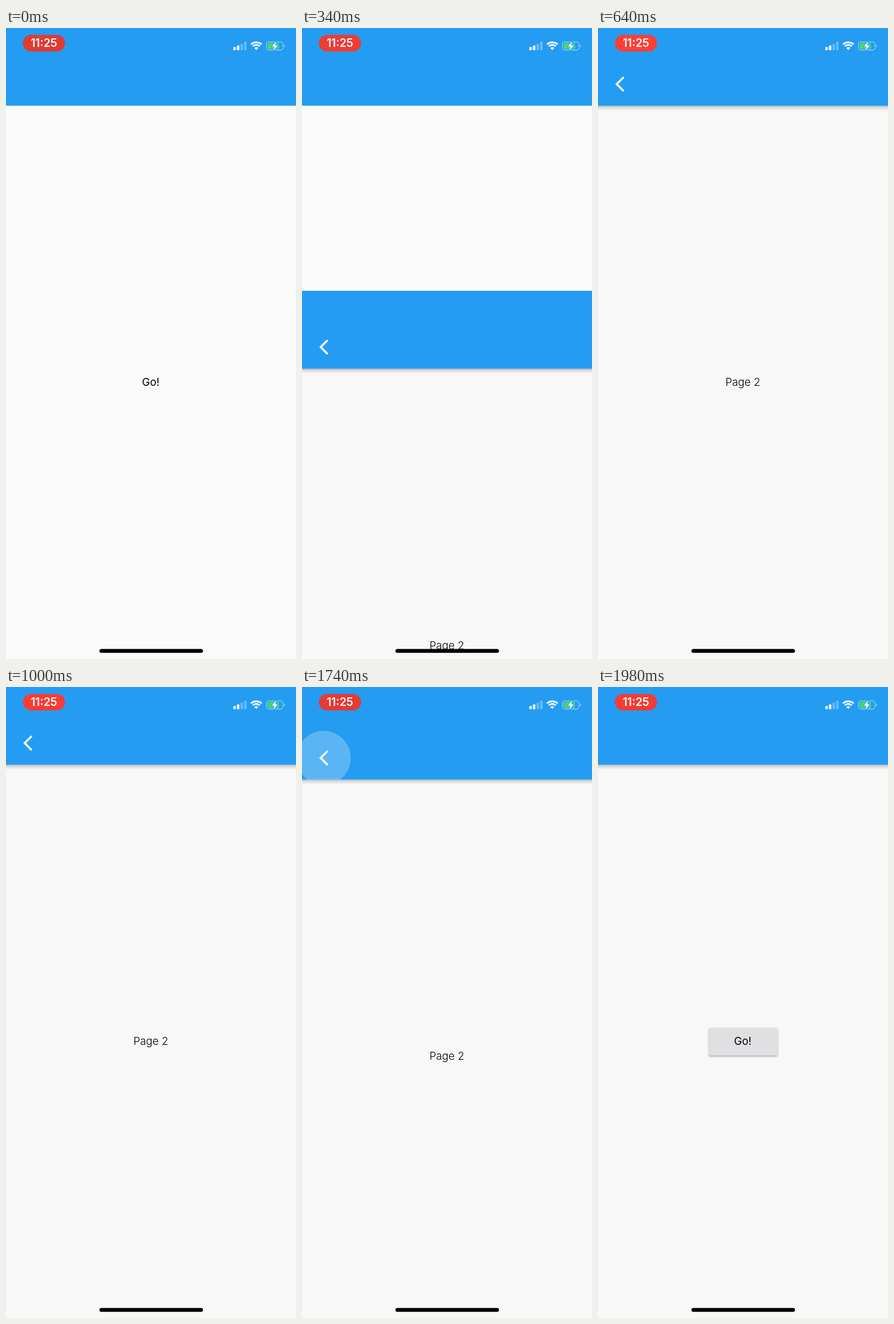
Write an HTML page that moves like this. It is 508x1102 px and loops after 2 s.

```html
<!DOCTYPE html>
<html lang="en">
<head>
<meta charset="utf-8">
<title>Page slide</title>
<style>
  html, body { margin: 0; width: 100%; height: 100%; overflow: hidden; background: #fafafa; }
  svg { display: block; width: 100%; height: 100%; }
  text { font-family: Inter, Roboto, sans-serif; text-anchor: middle; }

  .anim { animation: 2s linear infinite; }
  .bar { fill: #249cf2; }
  .label { font-size: 18.8px; }
  .thin { font-weight: 350; }

  #home { animation-name: home; }
  #barShade { animation-name: shade; }
  #button { animation-name: press; filter: drop-shadow(0 2px 1.6px rgba(0, 0, 0, .3)); }
  #page { animation-name: slide; }
  #halo, #splash { fill: #fff; opacity: 0; transform-origin: 38px 98px; }
  #halo { animation-name: halo; }
  #splash { animation-name: splash; }
  #pill { animation-name: pulse; }

  @keyframes home {
    0%, 49.9% { fill: #fafafa; }
    50%, 100% { fill: #f8f8f9; }
  }
  @keyframes shade {
    0%, 49.9% { opacity: 0; }
    50%, 100% { opacity: 1; }
  }
  @keyframes press {
    0%, 8.9% { opacity: 0; fill: #e0e0e2; }
    9% { opacity: 1; fill: #e0e0e2; }
    13%, 25% { opacity: 1; fill: #d0d0d2; }
    50%, 100% { opacity: 1; fill: #e0e0e3; }
  }
  /* The way out runs the same ease curve backwards. */
  @keyframes slide {
    0% { transform: translateY(1102px); }
    13% { transform: translateY(1102px); animation-timing-function: cubic-bezier(.25, .1, .25, 1); }
    25% { transform: translateY(0); }
    84.7% { transform: translateY(0); animation-timing-function: cubic-bezier(.75, 0, .75, .9); }
    96.65%, 100% { transform: translateY(1102px); }
  }
  @keyframes halo {
    0%, 81.5% { opacity: 0; }
    84.5%, 87.5% { opacity: .14; }
    92%, 100% { opacity: 0; }
  }
  @keyframes splash {
    0%, 81.5% { opacity: 0; transform: scale(.3); }
    82.5% { opacity: .14; }
    87% { opacity: .14; transform: scale(1); }
    92%, 100% { opacity: 0; transform: scale(1); }
  }
  @keyframes pulse {
    0% { fill: #e03b32; animation-timing-function: ease-in-out; }
    37.5% { fill: #ff3e36; animation-timing-function: ease-in-out; }
    77.5% { fill: #e03b32; animation-timing-function: ease-in; }
    100% { fill: #f23d35; }
  }
</style>
</head>
<body>
<svg viewBox="0 0 508 1102" preserveAspectRatio="none">
  <defs>
    <linearGradient id="fade" x1="0" y1="0" x2="0" y2="1">
      <stop offset="0" stop-color="#000" stop-opacity=".27"/>
      <stop offset=".4" stop-color="#000" stop-opacity=".11"/>
      <stop offset="1" stop-color="#000" stop-opacity="0"/>
    </linearGradient>
    <clipPath id="inBar"><rect width="508" height="136"/></clipPath>
  </defs>

  <g>
    <rect id="home" class="anim" width="508" height="1102" fill="#fafafa"/>
    <rect id="barShade" class="anim" y="135.5" width="508" height="9" fill="url(#fade)"/>
    <rect class="bar" width="508" height="135.7"/>
    <rect id="button" class="anim" x="194.2" y="594.8" width="120.3" height="48.8" rx="2.7"/>
    <text class="label" x="253.7" y="625.4">Go!</text>
  </g>

  <g id="page" class="anim">
    <rect width="508" height="1102" fill="#f8f8f8"/>
    <rect y="135.5" width="508" height="9" fill="url(#fade)"/>
    <rect class="bar" width="508" height="135.7"/>
    <g clip-path="url(#inBar)">
      <circle id="halo" class="anim" cx="38" cy="98" r="47.4"/>
      <circle id="splash" class="anim" cx="38" cy="98" r="47.4"/>
    </g>
    <path fill="#fff" transform="translate(30.2 81.7) scale(1.37 1.355)"
      d="M11.67 3.87 9.9 2.1 0 12l9.9 9.9 1.77-1.77L3.54 12z"/>
    <text class="label thin" x="253.7" y="625.4">Page 2</text>
  </g>

  <g id="status">
    <rect id="pill" class="anim" x="29.5" y="12" width="74" height="29" rx="14.5"/>
    <text x="66.4" y="33.4" font-size="19.4" font-weight="600" fill="#fff">11:25</text>

    <g fill="#fff">
      <rect x="398.2" y="33.2" width="4.3" height="5.6" rx="1.2"/>
      <rect x="404.5" y="30.4" width="4.3" height="8.4" rx="1.2"/>
      <g opacity=".32">
        <rect x="410.8" y="27.2" width="4.3" height="11.6" rx="1.2"/>
        <rect x="417.1" y="23.8" width="4.3" height="15" rx="1.2"/>
      </g>
      <path d="M438.5 38.6l-3.5-3.7a5 5 0 0 1 7 0z"/>
    </g>
    <g fill="none" stroke="#fff" stroke-width="3">
      <path d="M429.2 28.6a13.6 13.6 0 0 1 18.6 0"/>
      <path d="M432.4 32a8.9 8.9 0 0 1 12.2 0"/>
    </g>

    <rect x="456.4" y="24.3" width="28.8" height="14.2" rx="4" fill="none"
      stroke="#fff" stroke-opacity=".5" stroke-width="1.3"/>
    <path d="M487 29.2q1.8.5 1.8 2.3t-1.8 2.3z" fill="#fff" fill-opacity=".55"/>
    <rect x="458.4" y="26.2" width="19.8" height="10.4" rx="2.4" fill="#4cd964"/>
    <path d="M473 23.6l-7.4 8.8h4.5l-1.6 6.8 7.5-9h-4.6z" fill="#fff"
      stroke="#249cf2" stroke-width="1.8" paint-order="stroke"/>

    <rect x="163.7" y="1084.6" width="181.3" height="6.6" rx="3.3"/>
  </g>
</svg>
</body>
</html>
```
